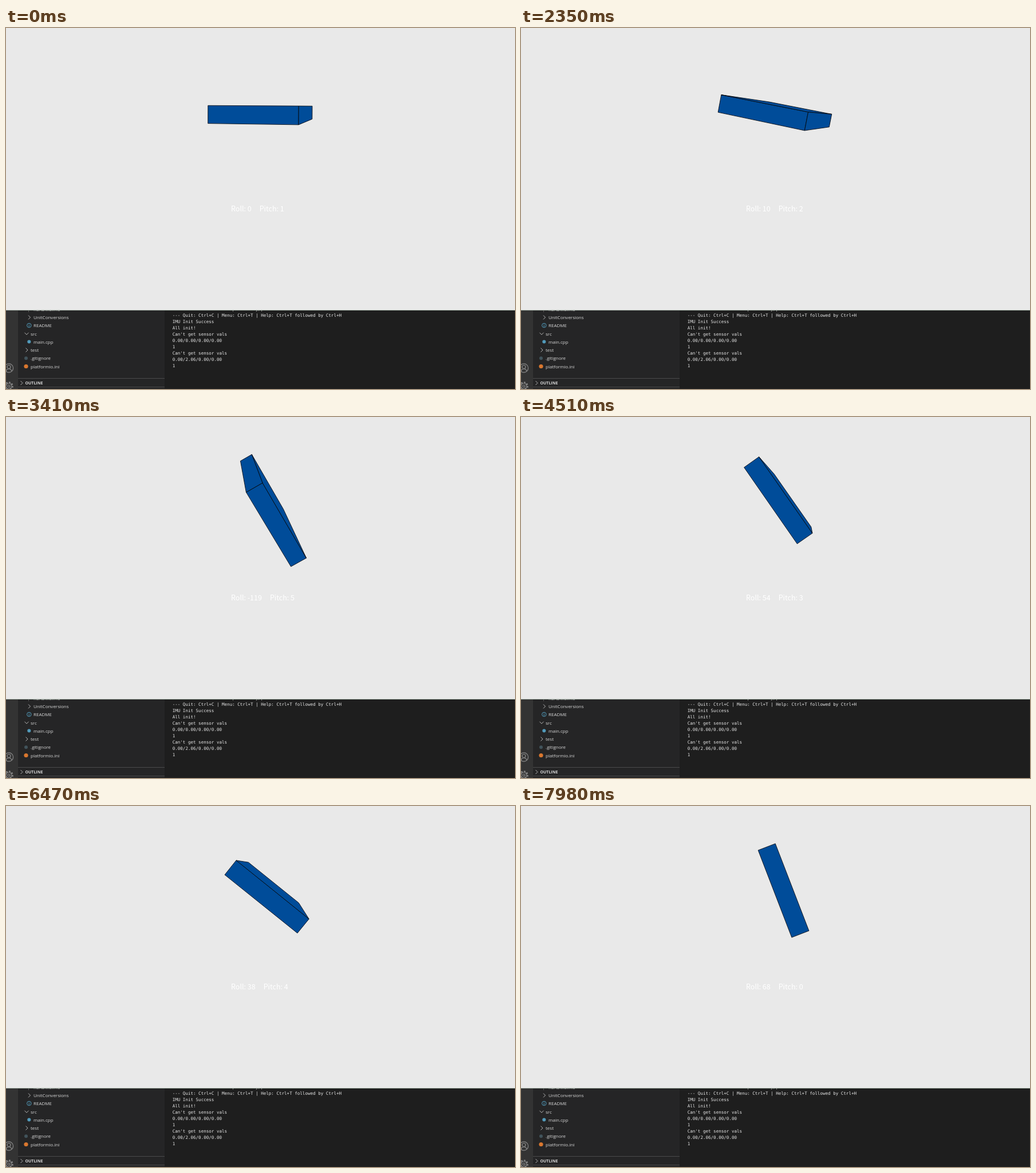
An HTML page for the animation above (8 s loop, 889x630 px).

```html
<!DOCTYPE html>
<html lang="en">
<head>
<meta charset="utf-8">
<title>IMU orientation</title>
<style>
  html, body { margin: 0; width: 100%; height: 100%; overflow: hidden; background: #e9e9e9; }
  svg { display: block; width: 889px; height: 630px; }
  text { white-space: pre; }
  #faces path { fill: #004c99; stroke: #000; stroke-width: .8; stroke-linejoin: round; }
  #label { font: 12.5px "Noto Sans CJK JP", "Noto Sans CJK SC", "Noto Sans CJK", "Open Sans", sans-serif; fill: #fff; }
  #files { font: 8px "Open Sans", "Noto Sans", sans-serif; fill: #d8d8d8; }
  #files .head { font-size: 7px; font-weight: 700; }
  #term { font: 7.56px "DejaVu Sans Mono", "Liberation Mono", monospace; fill: #e6e6e6; }
  .line { fill: none; stroke: #c5c5c5; stroke-width: .9; }
  .bar { fill: none; stroke: #8a8a8a; stroke-width: 1.2; }
</style>
</head>
<body>
<svg viewBox="0 0 889 630">
  <defs><clipPath id="ide"><rect y="492" width="889" height="138"/></clipPath></defs>
  <rect width="889" height="630" fill="#e9e9e9"/>

  <g clip-path="url(#ide)">
    <rect y="492" width="889" height="138" fill="#1e1e1e"/>
    <rect y="492" width="277" height="138" fill="#252526"/>
    <rect y="492" width="21" height="138" fill="#333"/>

    <g class="bar">
      <circle cx="5" cy="593.5" r="7.6"/>
      <circle cx="5" cy="591.5" r="3"/>
      <path d="M0 599q1-4 5-4t5 4"/>
      <circle cx="5" cy="625" r="5"/>
      <circle cx="5" cy="625" r="2"/>
      <circle cx="5" cy="625" r="6.6" stroke-width="2.4" stroke-dasharray="2.6 2.58"/>
    </g>

    <path d="M21 611.5H277M21 626.5H277" stroke="#4a4a4b"/>
    <path d="M39.5 492v4" stroke="#585858"/>
    <g class="line">
      <path d="M39 501.5l3.5 3.5l-3.5 3.5M34.5 558.5l3.5 3.5l-3.5 3.5M25.5 616l3.5 3.5l-3.5 3.5"/>
      <path d="M32.5 531.7l3.5 3.5l3.5-3.5"/>
    </g>
    <circle cx="40.3" cy="519" r="3.7" fill="none" stroke="#519aba"/>
    <path d="M40.3 516.6v1M40.3 518.4v3" stroke="#519aba" stroke-width="1.1"/>
    <circle cx="40.3" cy="547.5" r="3" fill="#519aba"/>
    <circle cx="35" cy="576.3" r="3" fill="#41535b"/>
    <circle cx="35" cy="590.5" r="3.6" fill="#d9772f"/>

    <g id="files"><text class="head" x="33.5" y="622">OUTLINE</text></g>
    <g id="term"></g>
    <rect y="492" width="889" height="1" fill="#a0aca2"/>
  </g>

  <g id="faces"></g>
  <text id="label" x="393" y="320"></text>
</svg>

<script>
const NS = "http://www.w3.org/2000/svg";
const LOOP = 8000, STEP = 70;
const CX = 458.5, CY = 149, DIST = 677;
const HALF = [66.6, 13.15, 124];

// turning points of the swing: the box eases from each pose to the next
const POSES = [
  { at: 1400, roll: 0.3, pitch: 1.1, yaw: -10.8 },
  { at: 2310, roll: 10.9, pitch: 2.05, yaw: -14.9 },
  { at: 3360, roll: -119.7, pitch: 5.9, yaw: -11.8 },
  { at: 4480, roll: 54.9, pitch: 3.7, yaw: -6.4 },
  { at: 5600, roll: -123.9, pitch: 9.8, yaw: -6.5 },
  { at: 6440, roll: 38.8, pitch: 4.5, yaw: -1.35 },
  { at: 7350, roll: -90, pitch: 5, yaw: -3 },
  { at: 7980, roll: 68.9, pitch: -0.6, yaw: 0 }
];

// corners are numbered by bits: 1 = right, 2 = bottom, 4 = front
const FACES = ["4576", "1023", "0154", "6732", "5137", "0462"].map(f => [...f]);

const make = (tag, parent) => parent.appendChild(document.createElementNS(NS, tag));
const label = document.getElementById("label");
const facesBox = document.getElementById("faces");
const facePaths = FACES.map(() => make("path", facesBox));

function write(id, x, y, content) {
  const row = make("text", document.getElementById(id));
  row.setAttribute("x", x);
  row.setAttribute("y", y);
  row.textContent = content;
}

// a leading space marks a nested entry
[" README.md", " UnitConversions", " README", "src", " main.cpp", "test", ".gitignore", "platformio.ini"]
  .forEach((name, i) => write("files", name[0] === " " ? 48 : 43, 493.7 + i * 14.27, name.trim()));

const reading = gyro => ["Can't get sensor vals", `0.00/${gyro}/0.00/0.00`, "1"];
[
  "                       p        y/p",
  "--- Quit: Ctrl+C | Menu: Ctrl+T | Help: Ctrl+T followed by Ctrl+H",
  "IMU Init Success", "All init!",
  ...reading("0.00"), ...reading("2.06")
].forEach((line, i) => write("term", 290.7, 492.8 + i * 11.02, line));

function poseAt(t) {
  const next = POSES.findIndex(p => p.at > t);
  if (next < 1) return next ? POSES[POSES.length - 1] : POSES[0];
  const a = POSES[next - 1], b = POSES[next];
  const u = (1 - Math.cos(Math.PI * (t - a.at) / (b.at - a.at))) / 2;
  const mix = key => a[key] + (b[key] - a[key]) * u;
  return { roll: mix("roll"), pitch: mix("pitch"), yaw: mix("yaw") };
}

function turn(a, b, deg) {
  const r = deg * Math.PI / 180, c = Math.cos(r), s = Math.sin(r);
  return [a * c - b * s, a * s + b * c];
}

function project(n, { roll, pitch, yaw }) {
  let [x, y, z] = HALF.map((h, i) => n >> i & 1 ? h : -h);
  [z, x] = turn(z, x, yaw);
  [x, y] = turn(x, y, roll);
  [y, z] = turn(y, z, -pitch);
  const k = DIST / (DIST - z);
  return [CX + x * k, CY + y * k];
}

function draw(t) {
  const pose = poseAt(t);
  FACES.forEach((face, i) => {
    const pts = face.map(n => project(n, pose));
    const [a, b, c, d] = pts;
    const area = (c[0] - a[0]) * (d[1] - b[1]) - (c[1] - a[1]) * (d[0] - b[0]);
    const outline = pts.map(p => p.map(v => v.toFixed(2)).join(" ")).join("L");
    facePaths[i].setAttribute("d", area > 0 ? `M${outline}Z` : "");
  });
  label.textContent = `Roll: ${Math.trunc(pose.roll)}     Pitch: ${Math.trunc(pose.pitch)}`;
}

function tick() {
  const t = performance.now() % LOOP;
  draw(Math.floor(t / STEP) * STEP);
  requestAnimationFrame(tick);
}
tick();
</script>
</body>
</html>
```
